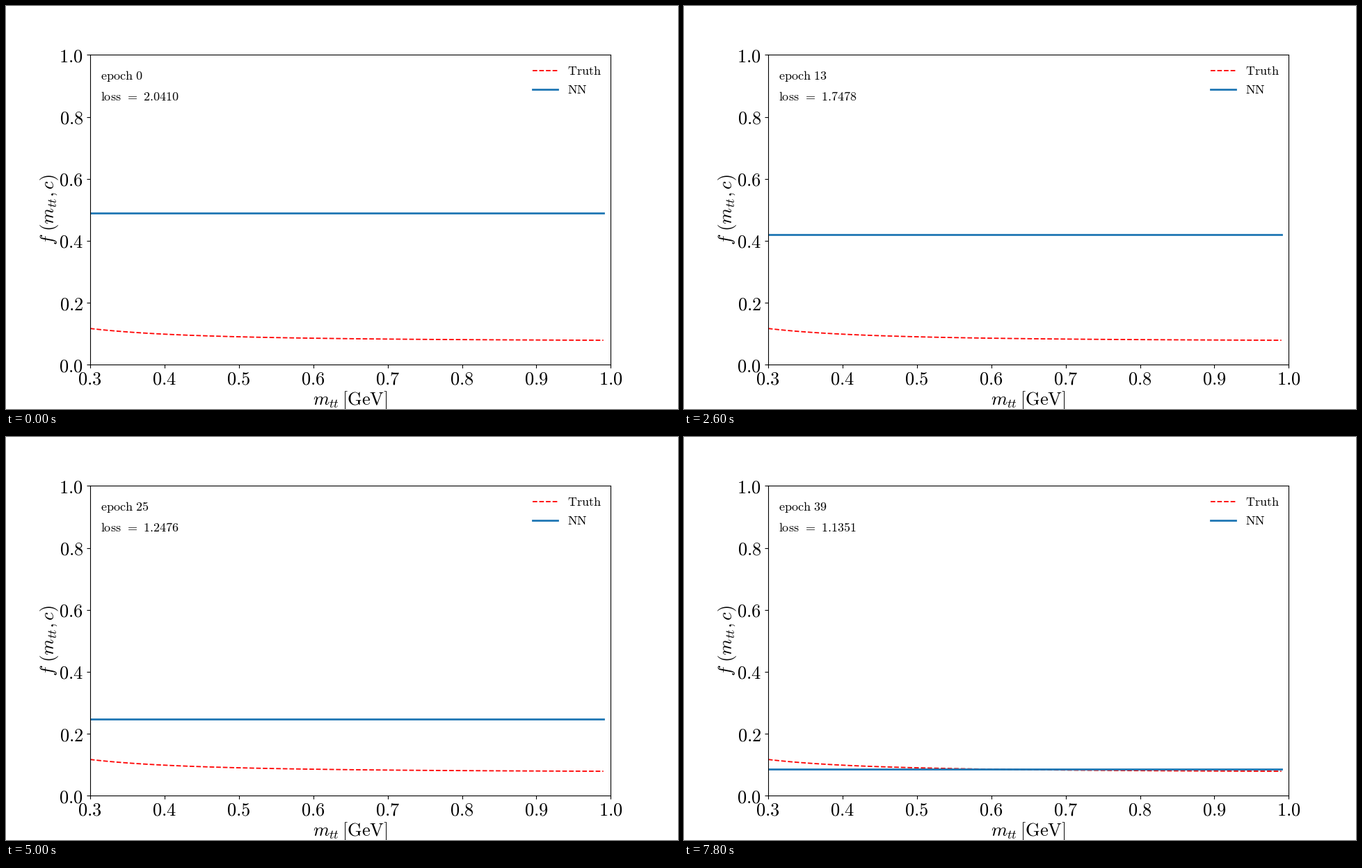
These frames come from a looping animation (966x580 px, 8000 ms). A matplotlib script:

```python
import numpy as np
import matplotlib.pyplot as plt
from matplotlib.animation import FuncAnimation

W, H, DPI = 966, 580, 100
EPOCHS, STEP_MS = 40, 200

plt.rcParams["mathtext.fontset"] = "cm"


def level_at(epoch):
    """Network output: a skewed sigmoid falling towards the truth."""
    q = 3.03 - 0.1394 * epoch + 0.0016 * epoch ** 2 - 6.19e-5 * epoch ** 3
    return 0.075 + 0.435 / (1 + np.exp(-q))


def loss_at(level):
    return 0.7351 + 5 * level ** 2 - 0.148 * np.log(level)


def truth(m):
    return 0.075 + 0.003766 / m ** 2


def pixel_text(x, y, s, **kw):
    """Centred text with its baseline at stage pixels, y from the top."""
    fig.text(x / W, 1 - y / H, s, fontsize=19, ha="center", va="baseline",
             rotation_mode="anchor", **kw)


fig, ax = plt.subplots(figsize=(W / DPI, H / DPI), dpi=DPI)
fig.subplots_adjust(left=0.125, right=0.9, bottom=0.11, top=0.8785)
ax.set_xlim(0.3, 1.0)
ax.set_ylim(0.0, 1.0)

ax.set_xticks(np.arange(3, 11) / 10)
ax.set_yticks(np.arange(0, 11, 2) / 10)
for axis in (ax.xaxis, ax.yaxis):
    axis.set_major_formatter(lambda v, _: rf"$\mathrm{{{v:.1f}}}\hspace{{0.08}}$")
ax.tick_params(labelsize=19)
ax.tick_params(axis="x", pad=2.8)

pixel_text(494.5, 574, r"$m_{tt}\,\mathrm{[GeV]}$")
pixel_text(69.5, 292.5, r"$f\ (m_{tt},c)$", rotation=90)

m = np.linspace(0.3, 0.99, 70)
ax.plot(m, truth(m), "--", color="red", lw=1.3, label=r"$\mathrm{Truth}$")
nn, = ax.plot(m, np.full_like(m, level_at(0)), color="#1f77b4", lw=2,
              label=r"$\mathrm{NN}$")
ax.legend(loc="upper right", bbox_to_anchor=(1.004, 1.004), fontsize=13,
          frameon=False)

epoch_text = ax.text(0.02, 0.92, "", fontsize=13, transform=ax.transAxes)
loss_text = ax.text(0.02, 0.852, "", fontsize=13, transform=ax.transAxes)


def update(epoch):
    level = level_at(epoch)
    nn.set_ydata(np.full_like(m, level))
    epoch_text.set_text(rf"$\mathrm{{epoch}}\hspace{{0.34}}\mathrm{{{epoch}}}$")
    loss_text.set_text(r"$\mathrm{loss}\hspace{0.415}=\hspace{0.415}"
                       rf"\mathrm{{{loss_at(level):.4f}}}$")
    return nn, epoch_text, loss_text


anim = FuncAnimation(fig, update, frames=EPOCHS, interval=STEP_MS,
                     repeat=True, repeat_delay=0)
plt.show()
```
